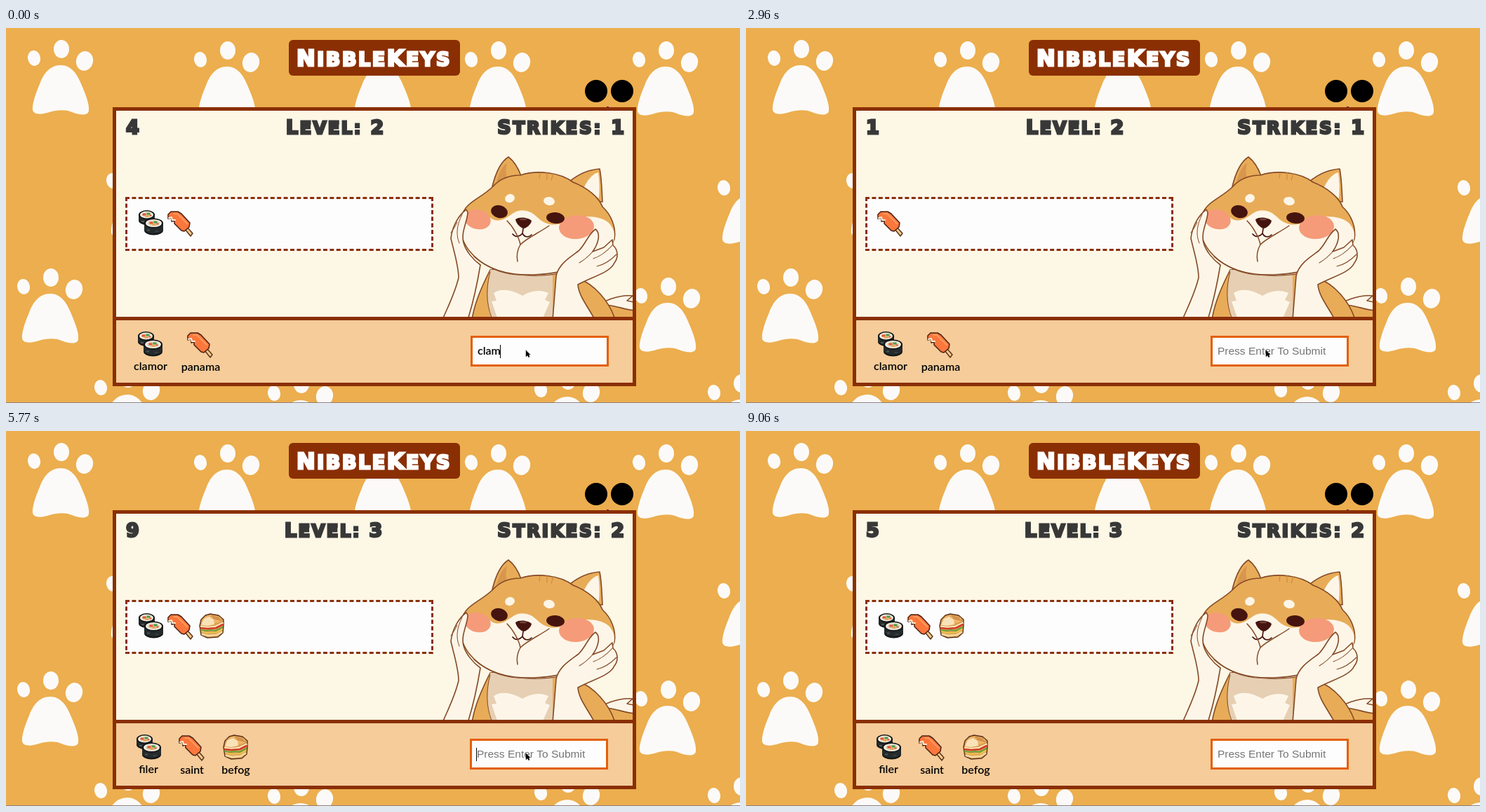
Animation of 1046 by 535 pixels, one loop 9.16 s. Source, as an HTML page with a canvas:

```html
<!DOCTYPE html>
<html lang="en">
<head>
<meta charset="utf-8">
<title>NibbleKeys</title>
<style>
html, body { margin: 0; width: 100%; height: 100%; overflow: hidden; background: #ecae4e; }
canvas { display: block; }
</style>
</head>
<body>
<canvas id="stage" width="1046" height="535"></canvas>
<script>
const ctx = document.getElementById('stage').getContext('2d');
const LOOP = 9160;
const BROWN = '#8a2f04', CREAM = '#fdf7e6', INK = '#383838', PAPER = '#fdfdfd';
const FUR = '#e8ac58', SKIN = '#fdf6e8', LINE = '#854a26', DARK = '#46140f', SHADE = '#e6cfb3';
const LABEL = '600 16px Lato, sans-serif';
const HINT = '15.5px "Liberation Sans", Arial, sans-serif';

// Each track is a list of [start time, value].
const typed = [
  [0, 'clam'], [150, 'clamo'], [300, 'clamor'], [740, ''],
  [2080, 'wr'], [2230, 'wro'], [2380, 'wron'], [2520, 'wrong'], [2670, ''],
  [4890, 'wr'], [5040, 'wro'], [5190, 'wron'], [5330, 'wrong'], [5630, ''],
  [6220, 'wr'], [6370, 'wron'], [6510, 'wrong'], [6810, '']
];
const caret = [
  [0, 1], [1030, 0], [1330, 1], [1780, 0], [2080, 1], [2960, 0], [3400, 1],
  [3850, 0], [4290, 1], [5920, 0], [6220, 1], [7100, 0], [7540, 1], [7980, 0],
  [8610, 1], [9060, 0]
];
const timer = [
  [0, 4], [1030, 3], [2080, 2], [2960, 1], [3850, 10], [5040, 9],
  [5920, 8], [6960, 7], [7980, 6], [8910, 5]
];
const inputShake = [
  [0, 0], [2670, 2], [2820, -2], [2960, 0], [5630, -2], [5770, -1],
  [5920, 0], [6810, -2], [6960, 1], [7100, 0]
];
const dogShake = [[0, 0], [3850, 1], [4000, -2.5], [4150, 2], [4290, -1], [4440, 0]];

function at(track, t) {
  let value = track[0][1];
  for (const [start, v] of track) if (start <= t) value = v;
  return value;
}

function rect(x, y, w, h, fill) {
  ctx.fillStyle = fill;
  ctx.fillRect(x, y, w, h);
}

function oval(x, y, rx, ry, fill, turn = 0) {
  ctx.beginPath();
  ctx.ellipse(x, y, rx, ry, turn, 0, Math.PI * 2);
  ctx.fillStyle = fill;
  ctx.fill();
}

function shape(d, fill, stroke, width = 1.6) {
  const path = new Path2D(d);
  if (fill) {
    ctx.fillStyle = fill;
    ctx.fill(path);
  }
  if (stroke) {
    ctx.strokeStyle = stroke;
    ctx.lineWidth = width;
    ctx.lineJoin = ctx.lineCap = 'round';
    ctx.stroke(path);
  }
}

function moved(x, y, draw) {
  ctx.save();
  ctx.translate(x, y);
  draw();
  ctx.restore();
}

function write(text, x, y, font, color, align = 'left') {
  ctx.font = font;
  ctx.fillStyle = color;
  ctx.textAlign = align;
  ctx.fillText(text, x, y);
}

// Heavy small caps; a negative direction sets the text leftwards from x.
function caps(text, x, y, big, small, gap, color, dir = 1) {
  const face = c => `bold ${/[a-z:]/.test(c) ? small : big}px "DejaVu Sans", sans-serif`;
  const widths = [...text].map(c => {
    ctx.font = face(c);
    return ctx.measureText(c.toUpperCase()).width + gap;
  });
  if (dir < 0) x -= widths.reduce((a, b) => a + b, -gap);
  ctx.strokeStyle = color;
  ctx.lineWidth = 2.8;
  ctx.lineJoin = 'miter';
  ctx.miterLimit = 3;
  [...text].forEach((c, i) => {
    write(c.toUpperCase(), x, y, face(c), color);
    ctx.strokeText(c.toUpperCase(), x, y);
    x += widths[i];
  });
}

function paw(x, y) {
  moved(x, y, () => {
    const white = '#fcfaf8';
    oval(-39, 13, 9, 11, white, -0.2);
    oval(0, 0, 11, 13, white);
    oval(33, 17, 12, 14, white, 0.25);
    shape('M-1 23C-17 23-26 36-31 50C-37 64-42 79-41 87C-39 95-26 93-17 90' +
      'C-6 87 5 86 15 90C25 94 38 96 39 88C40 78 34 64 29 52C23 36 14 23-1 23Z', white);
  });
}

function background() {
  rect(0, 0, 1046, 535, '#ecae4e');
  const spots = [
    [79, 30], [316, 32], [538, 32], [702, 32], [941, 32], [191, 205], [1062, 215],
    [64, 356], [944, 369], [174, 500], [421, 508], [801, 503], [1048, 507]
  ];
  spots.forEach(p => paw(...p));
  rect(0, 534, 1046, 1, '#90807e');
}

function roll(x, y, rx, ry, h) {
  const body = '#252b2c';
  oval(x, y + h, rx, ry, '#101414');
  rect(x - rx, y, rx * 2, h, body);
  oval(x, y + h - 1, rx - 1, ry - 1, body);
  oval(x, y, rx, ry, '#101414');
  oval(x, y, rx - 2, ry - 1.5, '#f3eee2');
  oval(x, y, rx - 5, ry - 3, '#d8cfb8');
  rect(x - 6, y - 2, 5, 3, '#e9542c');
  rect(x - 2, y + 1, 5, 2, '#f29a3a');
  rect(x, y - 3, 5, 3, '#4f9b45');
  rect(x + 4, y, 3, 2, '#e9542c');
  rect(x - rx + 4, y + ry + 2, 4, 2, '#4b5553');
  rect(x + 2, y + ry + 4, 5, 1, '#4b5553');
}

function sushi() {
  roll(11.5, 6.5, 11.5, 6.5, 8);
  roll(21.5, 18.5, 13.5, 7, 10);
}

function popsicle() {
  shape('M25 26L28 23L36 32L33 36Z', '#f3c887', '#54301a', 1.4);
  shape('M1 5L5 1L15 1L20 4L32 17L31 23L24 29L20 28L10 18L10 14L6 15L6 10L1 11Z',
    '#fb773c', '#4b2014', 1.5);
  shape('M9 4L14 4L28 18', null, '#ff9a5c', 2);
  shape('M2 10L6 9L7 13L11 13', null, '#fff0d8', 2);
}

function sandwich() {
  shape('M1 18L3 9L9 3L16 1L28 3L35 9L35 18L34 28L27 34L12 35L3 31Z',
    '#d9a055', '#5b321b', 1.4);
  shape('M3 14L6 8L12 3L20 3L31 6L33 11L25 14L12 15Z', '#eeb567');
  shape('M3 17L7 8L14 5L21 9L22 16L12 18Z', '#fae2b8');
  shape('M18 4L29 7M20 7L32 10', null, '#c98242', 1.3);
  shape('M3 19L12 20L23 19L34 14', null, '#fff0c4', 2);
  shape('M3 21L12 22L24 21L34 16', null, '#d33d2a', 2.6);
  shape('M3 24L10 25L17 24L24 25L33 20', null, '#6ca23d', 2.2);
  shape('M4 26L13 28L25 27L33 23', null, '#f6c94b', 1.6);
  shape('M5 30L13 32L25 31L32 27', null, '#f6d59b', 3);
}

function dog() {
  // tail and body
  shape('M836 400C850 390 872 380 893 382L885 389L899 392V420H836Z', SKIN, LINE);
  shape('M843 396C864 392 880 403 899 403V420H843Z', FUR, LINE);
  shape('M690 345C680 365 668 390 664 416H868C860 390 838 365 815 357L780 340Z', FUR, LINE);
  shape('M690 345C686 370 684 393 692 416H779V345Z', SHADE);
  shape('M701 416L692 390L699 389L695 378C706 370 722 374 736 382' +
    'C748 374 762 373 773 378L768 388L775 391L764 416Z', SKIN);
  shape('M690 348C684 370 684 392 692 413', null, LINE, 1);

  // ears and head
  shape('M693 226C698 206 706 190 716 184C724 190 730 200 734 211L720 236Z', FUR, LINE);
  shape('M699 220C703 204 709 195 714 193C711 205 713 213 717 220Z', '#d8964e');
  shape('M803 219C815 209 831 202 846 201C849 215 849 232 850 248L825 245Z', FUR, LINE);
  shape('M823 229C828 217 836 208 844 206C846 219 846 231 845 243Z', SKIN);
  shape('M651 264C657 248 678 242 694 226C705 214 718 210 733 210C757 202 790 206 808 220' +
    'C829 228 845 242 850 255C862 266 870 284 867 301C856 327 834 338 815 343' +
    'C792 352 760 355 731 352C693 350 660 327 651 301C648 289 648 277 651 264Z', FUR, LINE);
  shape('M761 207L760 214M771 206V216M780 208L777 217', null, '#cf8a40', 1.2);

  // cheeks and muzzle
  shape('M652 274C663 261 682 263 692 272C704 279 714 270 723 264C732 257 748 260 756 269' +
    'C768 281 780 283 794 278C812 266 846 266 859 278C867 287 868 294 866 303' +
    'C856 325 833 338 814 343C785 353 750 354 731 352C695 349 662 328 652 302' +
    'C649 291 649 283 652 274Z', SKIN);
  shape('M667 326C690 347 722 353 752 352C785 351 809 344 833 333', null, LINE);
  oval(672, 273, 19, 14, '#f59b79', 0.25);
  oval(813, 284, 25, 17, '#f59b79', -0.08);
  oval(718, 243, 7, 6, SKIN, -0.4);
  oval(774, 247, 8, 6, SKIN, 0.2);
  oval(703, 262, 12, 9, DARK, 0.25);
  oval(783, 271, 13, 8, DARK, 0.1);
  shape('M726 273C731 269 744 270 749 275C748 281 741 286 737 286C732 284 727 279 726 273Z', DARK);
  oval(737, 273, 5, 1.3, '#74463b');
  shape('M737 286L736 293C732 298 726 299 722 294M736 293C739 299 745 299 749 295',
    null, DARK, 1.7);
  shape('M714 275C722 283 731 298 733 309C729 316 727 323 729 333M733 309C743 299 760 292 774 282',
    null, LINE, 1.5);

  // left arm
  shape('M656 259C646 266 636 282 634 300C638 318 645 339 645 356C640 378 630 397 622 416' +
    'H658C666 391 671 368 676 338C666 331 655 318 652 306C648 291 658 275 658 263Z', SKIN, LINE);
  shape('M650 266C642 282 641 295 646 307', null, LINE, 1);
  shape('M634 292C637 288 641 282 643 277', null, LINE, 1);

  // right arm
  shape('M840 287C829 295 827 307 816 318C804 327 787 337 784 354L779 416H839' +
    'C829 397 816 382 815 366C835 355 861 349 867 335C874 326 871 315 865 310' +
    'L864 302L852 313L836 319C844 308 848 293 840 287Z', SKIN, LINE);
  shape('M836 319C830 326 824 331 817 335M864 310C855 320 846 326 837 329' +
    'M870 323C861 332 851 338 842 340', null, LINE, 1.1);
}

function frameBox() {
  rect(152, 113, 746, 398, BROWN);
  rect(157, 118, 736, 294, CREAM);
  rect(157, 417, 736, 89, '#f5cc9a');
  rect(856, 112, 3, 1, '#551a8b');
  ctx.beginPath();
  ctx.roundRect(403, 17, 244, 51, 6);
  ctx.fillStyle = BROWN;
  ctx.fill();
  caps('NibbleKeys', 414, 54, 32, 27, 2.5, '#fff');
  oval(841, 90, 16, 16, '#000');
  oval(878, 90, 16, 16, '#000');
}

function queueBox() {
  rect(170, 241, 439, 77, PAPER);
  ctx.save();
  ctx.setLineDash([6, 3.4]);
  ctx.lineCap = 'butt';
  ctx.strokeStyle = BROWN;
  ctx.lineWidth = 3;
  ctx.beginPath();
  for (const y of [242.5, 316.5]) {
    ctx.moveTo(170, y);
    ctx.lineTo(609, y);
  }
  for (const x of [171.5, 607.5]) {
    ctx.moveTo(x, 241);
    ctx.lineTo(x, 318);
  }
  ctx.stroke();
  ctx.restore();
}

function foods(t) {
  if (t < 740) moved(189, 260, sushi);
  if (t < 3850) {
    moved(t < 740 ? 230 : 187, 261, popsicle);
    moved(188, 433, sushi);
    moved(258, 434, popsicle);
    write('clamor', 206, 488, LABEL, '#000', 'center');
    write('panama', 277.5, 489, LABEL, '#000', 'center');
    return;
  }
  moved(189, 260, sushi);
  moved(230, 261, popsicle);
  moved(275, 260, sandwich);
  moved(186, 433, sushi);
  moved(246, 434, popsicle);
  moved(309, 433, sandwich);
  write('filer', 203, 488, LABEL, '#000', 'center');
  write('saint', 265, 489, LABEL, '#000', 'center');
  write('befog', 327.5, 489, LABEL, '#000', 'center');
}

function inputBox(t) {
  const text = at(typed, t);
  moved(at(inputShake, t), 0, () => {
    rect(662, 439, 197, 44, '#e45f0b');
    rect(665, 442, 191, 38, PAPER);
    if (text) write(text, 672, 466, LABEL, '#000');
    else write('Press Enter To Submit', 672, 466, HINT, '#757575');
    if (at(caret, t)) {
      ctx.font = LABEL;
      rect(671 + Math.round(ctx.measureText(text).width), 452, 1, 19, '#000');
    }
  });
}

// The pointer leaves through the bottom right corner in small hops.
function pointer(t) {
  if (t >= 7980) return;
  const hop = Math.floor((t - 6810) / 145);
  const p = Math.min(1, Math.max(0, hop / 7));
  const ease = p * p * (3 - 2 * p);
  moved(741 + 284 * ease, 460 + 70 * ease, () =>
    shape('M0 0V9L2 7L4 10L5 9L4 6H6Z', '#000', '#222', 0.5));
}

function draw(t) {
  const late = t >= 3850;
  background();
  frameBox();
  caps(String(at(timer, t)), 171, 151, 27, 24, 1, INK);
  caps(late ? 'Level: 3' : 'Level: 2', late ? 397 : 399, 151, 27, 24.5, 2.3, INK);
  caps(late ? 'Strikes: 2' : 'Strikes: 1', 881, 151, 27, 24.5, 2.8, INK, -1);
  queueBox();
  ctx.save();
  ctx.beginPath();
  ctx.rect(157, 118, 736, 294);
  ctx.clip();
  ctx.translate(at(dogShake, t), 0);
  dog();
  ctx.restore();
  foods(t);
  inputBox(t);
  pointer(t);
}

const begin = performance.now();
function tick() {
  draw((performance.now() - begin) % LOOP);
  requestAnimationFrame(tick);
}
tick();
</script>
</body>
</html>
```
